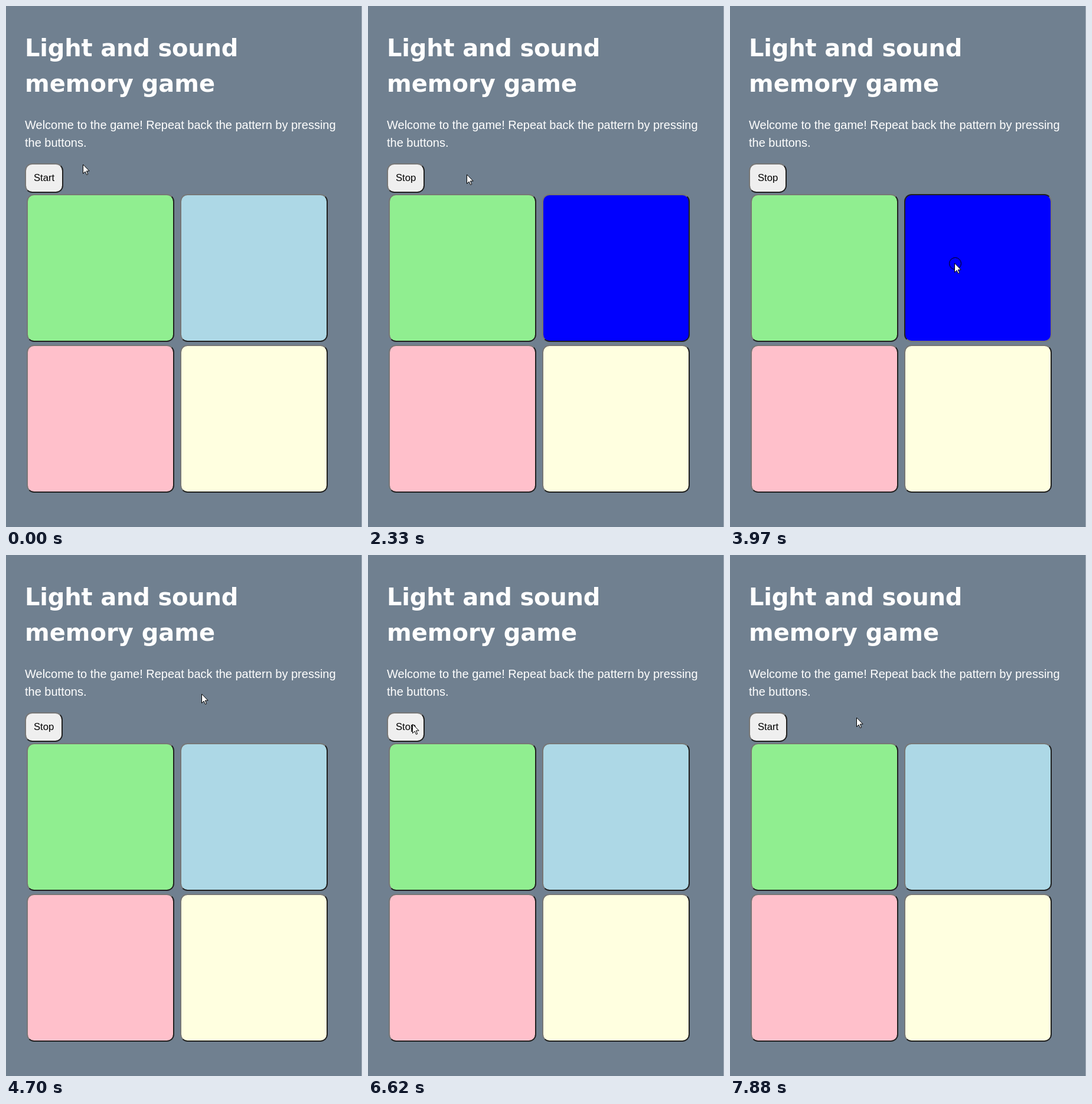
An HTML page for the animation above (8 s loop, 603 px wide and 881 px high).

```html
<!DOCTYPE html>
<html lang="en">
<head>
<meta charset="utf-8">
<title>Memory game</title>
<style>
html, body { margin: 0; width: 100%; height: 100%; overflow: hidden; background: #708090; }
body { color: #fff; font: 20px/30px "Liberation Sans", Arial, sans-serif; }
h1, p, svg { position: absolute; margin: 0; white-space: nowrap; }
h1 { left: 32px; top: 41px; font: bold 40px/60px "DejaVu Sans", sans-serif; }
h1 span { letter-spacing: -.2px; }
p { left: 32px; top: 186px; }
svg { left: 0; top: 0; }
.button {
  position: absolute; box-sizing: border-box; width: 250px; height: 250px;
  border: 2px solid; border-color: #767676 #212121 #212121 #767676; border-radius: 12.5px;
}
.button.pressed { border-color: #212121 #767676 #767676 #212121; }
#toggle {
  left: 32.4px; top: 266px; width: auto; height: 50px; padding: 0 12.5px;
  background: #efefef; color: #000; font-size: 16.67px; line-height: 45px;
}
#green { left: 35px; top: 318px; background: lightgreen; }
#blue { left: 295px; top: 318px; background: lightblue; }
#blue.lit { background: blue; }
#pink { left: 35px; top: 573px; background: pink; }
#yellow { left: 295px; top: 573px; background: lightyellow; }
</style>
</head>
<body>
<h1><span>Light and sound</span><br>memory game</h1>
<p>Welcome to the game! Repeat back the pattern by pressing<br>the buttons.</p>
<div class="button" id="toggle">Start</div>
<div class="button" id="green"></div>
<div class="button" id="blue"></div>
<div class="button" id="pink"></div>
<div class="button" id="yellow"></div>
<svg width="603" height="881">
  <path d="M602.5 0V881" stroke="#a4aeb9"/>
  <g id="cursor" stroke="#000">
    <circle id="ring" cx="1.5" cy="1.5" r="10" fill="none"/>
    <path d="M.5 1V16.4L4.1 13 6.6 18.4 8.7 17.5 6.4 12H11.2Z" fill="#fff"/>
  </g>
</svg>
<script>
const LOOP = 8000, STEP = 128;

// Pointer glides: start time, number of steps, destination.
const glides = [
  [0, 1, 130, 267], [420, 5, 74, 286], [1770, 3, 167, 284], [3700, 2, 380, 434],
  [4700, 1, 331, 234], [4820, 1, 263, 184], [4950, 2, 179, 288],
  [5370, 5, 119, 285], [6010, 1, 75, 285], [7750, 2, 214, 274]
];
const clicks = [
  { on: "toggle", down: 1220, up: 1350 },
  { on: "blue", down: 3970, up: 4700 },
  { on: "toggle", down: 6880, up: 7170 }
];
const cues = [[2330, 3400], [5630, 6620], [6750, 7750]];

const el = id => document.getElementById(id);
const [toggle, blue, cursor, ring] = ["toggle", "blue", "cursor", "ring"].map(el);

function pointer(t) {
  let x = 130, y = 267;
  for (const [start, steps, toX, toY] of glides) {
    if (t < start) break;
    const p = Math.min(1, (Math.floor((t - start) / STEP) + 1) / steps);
    x += (toX - x) * p;
    y += (toY - y) * p;
  }
  return [Math.round(x), Math.round(y)];
}

function draw(t) {
  const within = (from, to) => t >= from && t < to;
  const pressed = id => clicks.some(c => c.on === id && within(c.down, c.up));
  // The ring leads the press by a step, and leaves early on a long hold.
  const ringed = clicks.some(c => within(c.down - STEP, Math.min(c.up, c.down + 590)));
  const playing = within(clicks[0].up, clicks[2].up);

  cursor.setAttribute("transform", `translate(${pointer(t)})`);
  ring.setAttribute("visibility", ringed ? "visible" : "hidden");
  toggle.classList.toggle("pressed", pressed("toggle"));
  toggle.textContent = playing ? "Stop" : "Start";
  blue.classList.toggle("pressed", pressed("blue"));
  blue.classList.toggle("lit", pressed("blue") || cues.some(c => within(...c)));
}

const start = performance.now();
function tick() {
  draw((performance.now() - start) % LOOP);
  requestAnimationFrame(tick);
}
tick();
</script>
</body>
</html>
```
